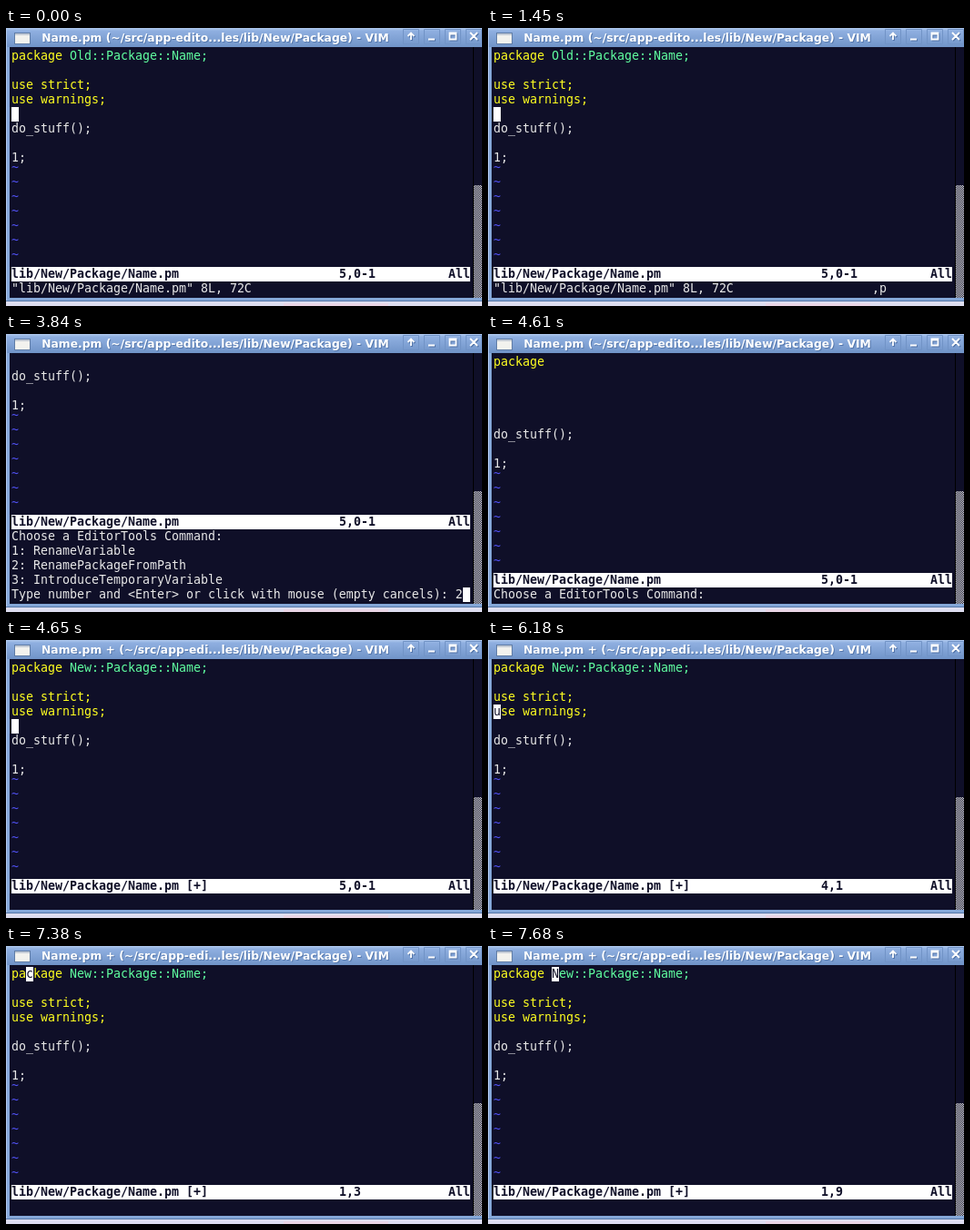
An HTML page with a canvas for the animation above (9990 ms loop, 523 by 306 pixels).

```html
<!DOCTYPE html>
<html lang="en">
<head>
<meta charset="utf-8">
<title>Vim package rename</title>
<style>
html, body { margin: 0; width: 100%; height: 100%; overflow: hidden; background: #dedef0; }
canvas { display: block; }
</style>
</head>
<body>
<canvas id="stage" width="523" height="306"></canvas>
<script>
const ctx = document.getElementById('stage').getContext('2d');
const LOOP = 9990, CELL = 8, LINE = 16, LEFT = 6, TOP = 23, COLS = 63;
const MONO = '13.29px "DejaVu Sans Mono", monospace';
const BG = '#0f0f28', TEXT = '#e8e8e8', YELLOW = '#ffff20', GREEN = '#60ffa0', BLUE = '#5050f0';
const FILE = 'lib/New/Package/Name.pm';
const MENU = ['Choose a EditorTools Command:', '1: RenameVariable',
  '2: RenamePackageFromPath', '3: IntroduceTemporaryVariable'];
const PROMPT = 'Type number and <Enter> or click with mouse (empty cancels): ';

function rect(x, y, w, h, color) {
  ctx.fillStyle = color;
  ctx.fillRect(x, y, w, h);
}

function stroke(color, width, path) {
  ctx.strokeStyle = color;
  ctx.lineWidth = width;
  ctx.stroke(new Path2D(path));
}

function write(row, col, text, color = TEXT, bold = false, lift = 0) {
  ctx.font = (bold ? 'bold ' : '') + MONO;
  ctx.textAlign = 'left';
  ctx.fillStyle = color;
  ctx.fillText(text, LEFT + col * CELL, TOP + row * LINE + 12 - lift);
}

function cursor(row, col, letter = '') {
  rect(LEFT + col * CELL, TOP + row * LINE, CELL, LINE, '#fff');
  write(row, col, letter, BG);
}

function tildes(first, last) {
  for (let row = first; row <= last; row++) write(row, 0, '~', BLUE, false, 5);
}

function statusBar(row, name, position) {
  rect(LEFT, TOP + row * LINE, COLS * CELL, LINE, '#fff');
  write(row, 0, name, BG, true);
  write(row, 45, position, BG, true);
  write(row, 60, 'All', BG, true);
}

function windowFrame(title) {
  rect(0, 0, 523, 306, '#dedef0');
  rect(305, 303, 115, 3, '#ead6e6');
  const shade = ctx.createLinearGradient(0, 0, 0, 21);
  shade.addColorStop(0, '#b0c9ee');
  shade.addColorStop(0.15, '#8fafe0');
  shade.addColorStop(1, '#7094c8');
  rect(0, 0, 523, 301, '#84a7d8');
  rect(0, 0, 523, 21, shade);
  rect(0, 0, 1, 301, '#b0c9ee');
  rect(0, 300, 523, 1, '#5577a8');
  rect(4, 21, 519, 276, BG);

  // scrollbar
  rect(513, 21, 1, 276, '#000');
  for (let y = 173; y < 297; y++)
    for (let x = 514 + y % 2; x < 523; x += 2) rect(x, y, 1, 1, '#e8e8e8');

  // menu icon
  rect(9, 5, 18, 13, '#5f7ca6');
  rect(10, 6, 16, 11, '#f2f2ee');
  rect(10, 6, 16, 2, '#c4ccd6');

  ctx.font = 'bold 12.33px "DejaVu Sans", sans-serif';
  ctx.textAlign = 'center';
  ctx.fillStyle = '#5678ac';
  ctx.fillText(title, 231, 16);
  ctx.fillStyle = '#fff';
  ctx.fillText(title, 230, 15);

  for (let x = 436.5; x < 520; x += 23) stroke('#7193c6', 1, `M${x} 1.5h17v16h-17z`);
  const glyphs = 'M445 13V5.5M441.5 9L445 5.5L448.5 9' +
    'M464 12.5H471M487.5 5.5H494.5V12.5H487.5ZM487.5 6.5H494.5' +
    'M510 5L518 13M518 5L510 13';
  ctx.save();
  ctx.translate(1, 1);
  stroke('#4f71a6', 1.8, glyphs);
  ctx.restore();
  stroke('#fff', 1.8, glyphs);
}

function buffer(name, position) {
  write(0, 0, 'package', YELLOW);
  write(5, 0, 'do_stuff();');
  write(7, 0, '1;');
  tildes(8, 14);
  statusBar(15, name, position);
}

function source(pkg) {
  write(0, 8, pkg + '::Package::Name;', GREEN);
  write(2, 0, 'use strict;', YELLOW);
  write(3, 0, 'use warnings;', YELLOW);
}

function beforeMenu(t) {
  buffer(FILE, '5,0-1');
  source('Old');
  cursor(4, 0);
  write(16, 0, `"${FILE}" 8L, 72C`);
  if (t >= 840) write(16, 52, ',');
  if (t >= 1450) write(16, 53, 'p');
}

function menu(answer) {
  write(1, 0, 'do_stuff();');
  write(3, 0, '1;');
  tildes(4, 10);
  statusBar(11, FILE, '5,0-1');
  MENU.forEach((line, i) => write(12 + i, 0, line));
  write(16, 0, PROMPT + answer);
  cursor(16, PROMPT.length + answer.length);
}

function renamed(t) {
  const row = 4 - [6180, 6360, 6530, 6670].filter(at => t >= at).length;
  let col = t >= 6880 ? 1 : 0;
  if (t >= 7380) col = Math.min(8, 2 + Math.floor((t - 7380) / 50));
  const letter = ['package New', '', 'u', 'u', ''][row][col] || '';
  buffer(FILE + ' [+]', `${row + 1},${letter ? col + 1 : '0-1'}`);
  source('New');
  cursor(row, col, letter);
}

function draw(t) {
  const path = t < 4650 ? 'Name.pm (~/src/app-edito' : 'Name.pm + (~/src/app-edi';
  windowFrame(path + '...les/lib/New/Package) - VIM');
  if (t < 1720) beforeMenu(t);
  else if (t < 4610) menu(t < 3840 ? '' : '2');
  else if (t < 4650) {
    buffer(FILE, '5,0-1');
    write(16, 0, MENU[0]);
  } else renamed(t);
}

const start = performance.now();
function tick() {
  draw((performance.now() - start) % LOOP);
  requestAnimationFrame(tick);
}
tick();
</script>
</body>
</html>
```
